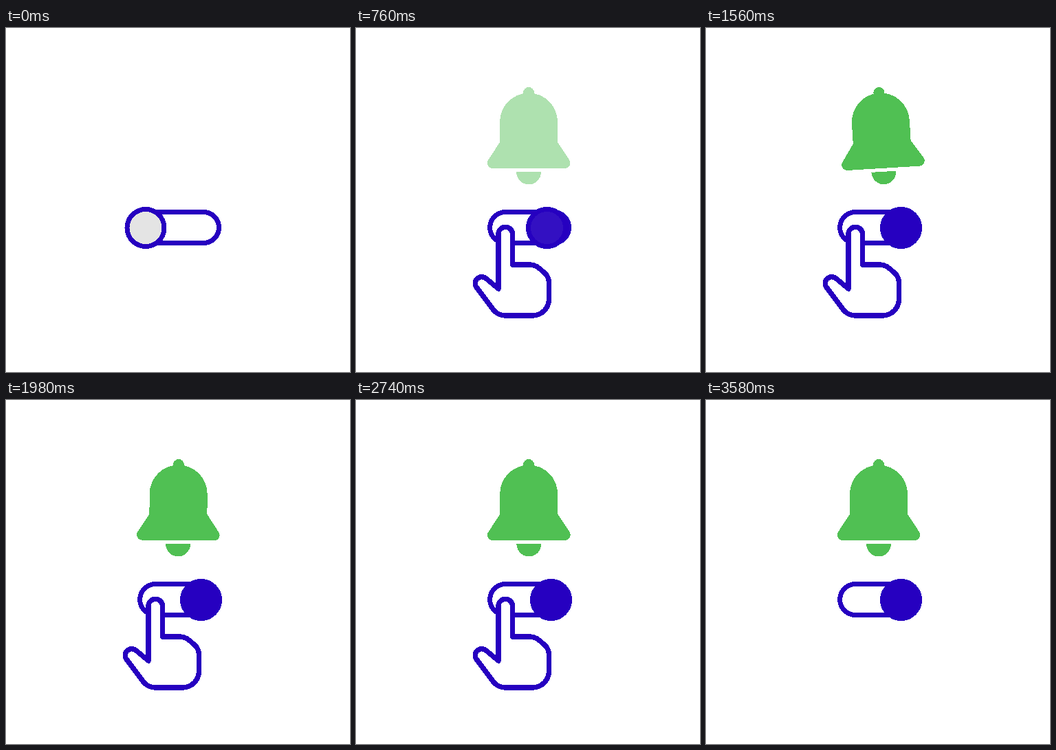
Recreate the animation shown at these times as an HTML page. Size 500 px wide and 500 px high, loop 3600 ms.

```html
<!DOCTYPE html>
<html lang="en">
<head>
<meta charset="utf-8">
<title>Notification toggle</title>
<style>
  html, body { margin: 0; width: 100%; height: 100%; overflow: hidden; background: #fff; }
  svg { display: block; width: 100vw; height: 100vh; shape-rendering: crispEdges; }
  .line { fill: #fff; stroke: #2600c0; stroke-width: 7; stroke-linejoin: round; }
  #hand { stroke-width: 7.4; }
  #bell { fill: #50c053; }
  #ticks { stroke: #70f086; stroke-width: 5.4; stroke-linecap: round; }
</style>
</head>
<body>
<svg viewBox="0 0 500 500">
  <g id="bell">
    <circle cx="251" cy="94" r="8"/>
    <path d="M209 136.5A42 42 0 0 1 293 136.5V166L309.8 191.5A7.9 7.9 0 0 1 303.5 204H198.5A7.9 7.9 0 0 1 192.2 191.5L209 166Z"/>
    <path d="M233 209H269A18 18.5 0 0 1 233 209Z"/>
  </g>
  <rect class="line" x="194.7" y="267.5" width="114.8" height="45" rx="22.5"/>
  <circle id="knob" class="line" cy="290.5"/>
  <path id="hand" class="line"/>
  <g id="ticks">
    <path id="tick" d="M0 -54.5V-45.5"/>
    <use href="#tick" transform="rotate(-47)"/>
    <use href="#tick" transform="rotate(47)"/>
  </g>
</svg>
<script>
const LOOP = 3600;
const $ = id => document.getElementById(id);
const bell = $('bell'), knob = $('knob'), hand = $('hand'), ticks = $('ticks');

const ramp = (t, a, b) => Math.min(1, Math.max(0, (t - a) / (b - a)));
const mix = (a, b, k) => a + (b - a) * k;
const inOut = u => u < .5 ? 2 * u * u : 1 - 2 * (1 - u) ** 2;
const sineOut = u => Math.sin(u * Math.PI / 2);

// Pressing shortens the finger and pulls the thumb in
const handPath = press => `M207 379
  L${207 - press} ${299.5 + 7 * press} a10.25 10.25 0 0 1 20.5 0 L227.5 344
  H252 Q260 344 266 349 L273 355 Q280.5 361 280.5 371
  V394 A24 24 0 0 1 256.5 418 H${217 - 3 * press} Q207 418 ${200 - 2 * press} 410
  L${176 + 3 * press} ${378 + 3 * press} a9.3 9.3 0 0 1 13.5 -13.5Z`;

// Winds up, then rings out as a damped pendulum
function bellAngle(t) {
  const swing = -11.8, peak = 1085, half = 262;
  if (t < peak) return swing * sineOut(ramp(t, 760, peak));
  const n = (t - peak) / half;
  return swing * .56 ** n * Math.cos(Math.PI * n);
}

function draw() {
  const t = performance.now() % LOOP;

  const tint = 100 * ramp(t, 430, 500), on = 100 * inOut(ramp(t, 500, 820));
  knob.setAttribute('cx', mix(203, 283.5, inOut(ramp(t, 438, 838))));
  knob.setAttribute('r', 27 - .7 * Math.sin(Math.PI * ramp(t, 360, 640)));
  knob.style.fill = `color-mix(in srgb, #2600c0 ${on}%, color-mix(in srgb, #dfebdf ${tint}%, #e4e4e4))`;

  const press = mix(1.4, 0, inOut(ramp(t, 430, 615)));
  hand.setAttribute('d', handPath(press));
  hand.setAttribute('transform', `rotate(${-4.5 * press} 225 395)`);
  hand.style.opacity = ramp(t, 20, 280) - ramp(t, 3270, 3570);

  const spread = mix(.75, 1, sineOut(ramp(t, 360, 500)));
  ticks.setAttribute('transform', `translate(210.5 316) rotate(-1.5) scale(${spread})`);
  ticks.style.opacity = ramp(t, 360, 420) - ramp(t, 530, 640);

  bell.setAttribute('transform', `rotate(${bellAngle(t)} 251 88)`);
  bell.style.opacity = ramp(t, 660, 880);

  requestAnimationFrame(draw);
}
draw();
</script>
</body>
</html>
```
